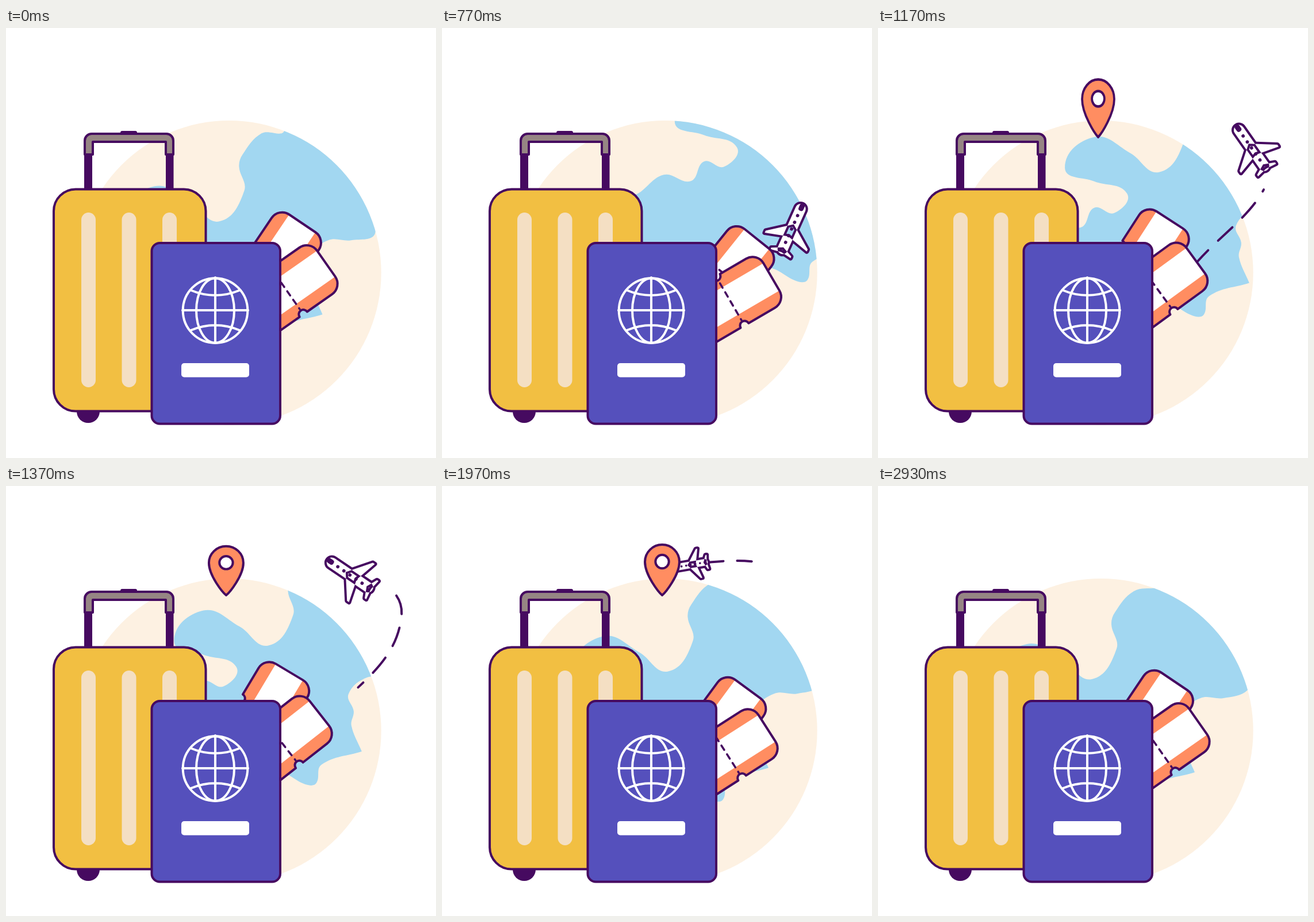
These frames come from a looping animation (748 by 748 pixels, 2.96 s). An HTML page with a canvas:

```html
<!DOCTYPE html>
<html lang="en">
<head>
<meta charset="utf-8">
<title>Travel</title>
<style>
  html, body { margin: 0; width: 100%; height: 100%; overflow: hidden; background: #fff; }
  canvas { display: block; }
</style>
</head>
<body>
<canvas id="stage" width="748" height="748"></canvas>
<script>
const ctx = document.getElementById('stage').getContext('2d');
const LOOP = 2960, DEG = Math.PI / 180;
const INK = '#460a60', ORANGE = '#ff8d61', LAND = '#fdf1e2', SEA = '#a2d7f1';

// Turning points of the two shores; a doubled point makes a sharp cape.
const NORTH = [[601, 94], [561, 100], [528, 137], [522, 158], [531, 200], [488, 253], [438, 220], [375, 192],
  [324, 245], [375, 269], [432, 290], [410, 324], [375, 315], [352, 349], [305, 338], [250, 375]];
const SOUTH = [[400, 540], [490, 480], [550, 503], [566, 500], [575, 468], [645, 445], [645, 445],
  [627, 400], [631, 375], [622, 345], [655, 316], [695, 316], [737, 302]];

// x, y and heading of the plane, one leg apart
const POSES = [[470, 465, -35], [608, 350, -66], [650, 209, -125], [530, 134, -180], [433, 137, -190], [335, 150, -190]];
const TAKEOFF = 370, LEG = 400, LANDING = 2170;

const smooth = u => u * u * (3 - 2 * u);

function key(t, stops, ease = u => u) {
  if (t <= stops[0][0]) return stops[0][1];
  for (let i = 1; i < stops.length; i++) {
    const [a, from] = stops[i - 1], [b, to] = stops[i];
    if (t < b) return from + (to - from) * ease((t - a) / (b - a));
  }
  return stops.at(-1)[1];
}

const gap = (p, q) => Math.hypot(q[0] - p[0], q[1] - p[1]);
const ahead = ([x, y], angle, d) => [x + d * Math.cos(angle), y + d * Math.sin(angle)];

// Smooth path through points, each tangent parallel to the line between its neighbours
function curve(pts, closed) {
  const p = new Path2D(), n = pts.length;
  const at = i => pts[closed ? (i + n) % n : Math.max(0, Math.min(n - 1, i))];
  const angle = i => Math.atan2(at(i + 1)[1] - at(i - 1)[1], at(i + 1)[0] - at(i - 1)[0]);
  p.moveTo(...pts[0]);
  for (let i = 0; i < (closed ? n : n - 1); i++) {
    const d = 0.37 * gap(at(i), at(i + 1));
    p.bezierCurveTo(...ahead(at(i), angle(i), d), ...ahead(at(i + 1), angle(i + 1), -d), ...at(i + 1));
  }
  return p;
}

function paint(path, fill, stroke = INK, width = 4) {
  if (fill) { ctx.fillStyle = fill; ctx.fill(path); }
  if (stroke) { ctx.strokeStyle = stroke; ctx.lineWidth = width; ctx.stroke(path); }
}

function box(x, y, w, h, r, fill, stroke = null) {
  const p = new Path2D();
  p.roundRect(x, y, w, h, r);
  paint(p, fill, stroke);
}

function disc(x, y, rx, ry, fill, stroke = null) {
  const p = new Path2D();
  p.ellipse(x, y, rx, ry, 0, 0, 7);
  paint(p, fill, stroke);
}

function placed(x, y, angle, draw) {
  ctx.save();
  ctx.translate(x, y);
  ctx.rotate(angle);
  draw();
  ctx.restore();
}

// r is the way still to go; the shores follow slightly different arcs.
const shift = (pts, dx, dy) => pts.map(([x, y]) => [x + dx, y + dy]);
const north = r => shift(NORTH, 236 * r - 39 * r * r - 116, 83 - 145 * r - 21 * r * r);
const south = r => shift(SOUTH, 186 * r - 22 * r * r - 94, 53 - 82 * r - 33 * r * r);

function drawWorld(t) {
  const left = s => ((LOOP - s) / 2190) ** 3;
  const r = left(t), old = r - left(0);
  ctx.save();
  ctx.beginPath();
  ctx.arc(388, 425.7, 264.7, 0, 7);
  ctx.fillStyle = LAND;
  ctx.fill();
  ctx.clip();
  paint(curve([...south(r), [900, 100], ...north(r), ...north(old), ...south(old)], true), SEA, null);
  ctx.restore();
}

const trailPath = curve([[478, 462], [555, 407], [688, 225], [580, 139], [383, 138]]);

function drawTrail(t) {
  const start = Math.max(0, 61 + 0.57 * (t - 1170));
  const end = key(t, [[672, 0], [1570, 480], [1970, 595], [2250, 665]]);
  const phase = key(t, [[1170, 31], [1570, 45]]);
  const dashes = [0];
  let at = 0;
  for (let s = phase - 58; s < end; s += 58) {
    const a = Math.max(s, start), b = Math.min(s + 34, end);
    if (b <= a) continue;
    dashes.push(a - at, b - a);
    at = b;
  }
  if (dashes.length < 2) return;
  ctx.setLineDash([...dashes, 2000]);
  paint(trailPath, null);
  ctx.setLineDash([]);
}

const planePath = new Path2D('M-9 0L21 40H25L14 0L25-40H21ZM35 0L44 19H47L44 0L47-19H44Z');
planePath.roundRect(-47, -9, 94, 18, 9);

function drawPlane(t) {
  if (t < TAKEOFF || t > LANDING) return;
  const leg = Math.floor((t - TAKEOFF) / LEG), u = (t - TAKEOFF) / LEG - leg, v = 1 - u;
  const from = POSES[leg], to = POSES[leg + 1], d = 0.38 * gap(from, to);
  const c1 = ahead(from, from[2] * DEG, d), c2 = ahead(to, to[2] * DEG, -d);
  const pos = i => v ** 3 * from[i] + 3 * v * v * u * c1[i] + 3 * v * u * u * c2[i] + u ** 3 * to[i];
  const dir = i => v * v * (c1[i] - from[i]) + 2 * v * u * (c2[i] - c1[i]) + u * u * (to[i] - c2[i]);
  const size = key(t, [[1570, 1], [1970, 0.64], [LANDING, 0.3]]);
  placed(pos(0), pos(1), Math.atan2(dir(1), dir(0)) + Math.PI, () => {
    ctx.scale(size, size);
    paint(planePath, null, INK, 8 / size);
    paint(planePath, '#fff', null);
    box(-48, -5, 13, 9, 4, INK);
    for (let i = -2; i < 3; i++) disc(i * 12.75, 0, 2.9, 2.9, INK);
  });
}

const ticketPath = new Path2D('M-130 0H-8A8 8 0 0 0 8 0H61A22 22 0 0 1 83 22V77A22 22 0 0 1 61 99H8A8 8 0 0 0-8 99H-130Z');

// x, y is the top notch at rest; the ticket swings about px, py.
function drawTicket(x, y, tilt, px, py, swing) {
  placed(px, py, swing * DEG, () => placed(x - px, y - py, tilt * DEG, () => {
    ctx.clip(ticketPath);
    ctx.fillStyle = ORANGE;
    ctx.fillRect(-140, 0, 240, 99);
    ctx.fillStyle = '#fff';
    ctx.fillRect(-140, 22, 240, 55);
    ctx.setLineDash([9, 9]);
    paint(new Path2D('M0 14V88'), null, INK, 3.6);
  }));
  placed(px, py, swing * DEG, () => placed(x - px, y - py, tilt * DEG, () => paint(ticketPath, null)));
}

function drawTickets(t) {
  const swing = key(t, [[170, 0], [770, 4.7], [1370, -3.1], [1970, 2.4], [2570, 0]], smooth);
  drawTicket(428, 381, -56, 202, 748, swing);
  drawTicket(460.5, 417, -35, 285, 619, swing);
}

const pinPath = new Path2D('M0-2C-6-7-30-37-30-60A30 30 0 0 1 30-60C30-37 6-7 0-2Z');

function drawPin(t) {
  const age = Math.min(t - 1050, 2740 - t);
  if (age <= 0) return;
  const tilt = key(t, [[1350, 0], [1570, -0.05], [1800, 0]], smooth);
  placed(383, 192, tilt, () => {
    ctx.scale(1 - Math.exp(-age / 45), 1 - Math.cos(Math.PI * age / 190) * Math.exp(-age / 110));
    paint(pinPath, ORANGE);
    disc(0, -60.5, 11.7, 11.7, '#fff', INK);
  });
}

const handlePath = new Path2D('M137 220V196A12 12 0 0 1 149 184H279A12 12 0 0 1 291 196V220H278V198H151V220Z');

function drawSuitcase() {
  box(136, 216, 14, 66, 0, INK);
  box(278, 216, 13.5, 66, 0, INK);
  box(199, 179, 29, 8, 3, INK);
  paint(handlePath, '#968584');
  disc(143, 667, 20, 20, INK);
  box(83, 280.5, 264.5, 386, 38, '#f2bf42', INK);
  for (let i = 0; i < 3; i++) box(131 + 70.5 * i, 321, 25, 304, 12.5, '#f4dfc3');
}

const gridPath = new Path2D('M364 434V548M307 491H421M321 456Q364 474 407 456M321 526Q364 508 407 526');

function drawPassport() {
  box(253.5, 374, 223.5, 314.5, 14, '#5550bc', INK);
  for (const rx of [56.3, 33]) disc(364, 491.5, rx, 56.3, null, '#fff');
  paint(gridPath, null, '#fff');
  box(305, 583, 118, 24.5, 5, '#fff');
}

function draw(t) {
  ctx.fillStyle = '#fff';
  ctx.fillRect(0, 0, 748, 748);
  drawWorld(t);
  drawTrail(t);
  drawPlane(t);
  drawPin(t);
  drawTickets(t);
  drawSuitcase();
  drawPassport();
}

ctx.lineCap = ctx.lineJoin = 'round';
const begin = performance.now();
function tick() {
  draw((performance.now() - begin) % LOOP);
  requestAnimationFrame(tick);
}
tick();
</script>
</body>
</html>
```
